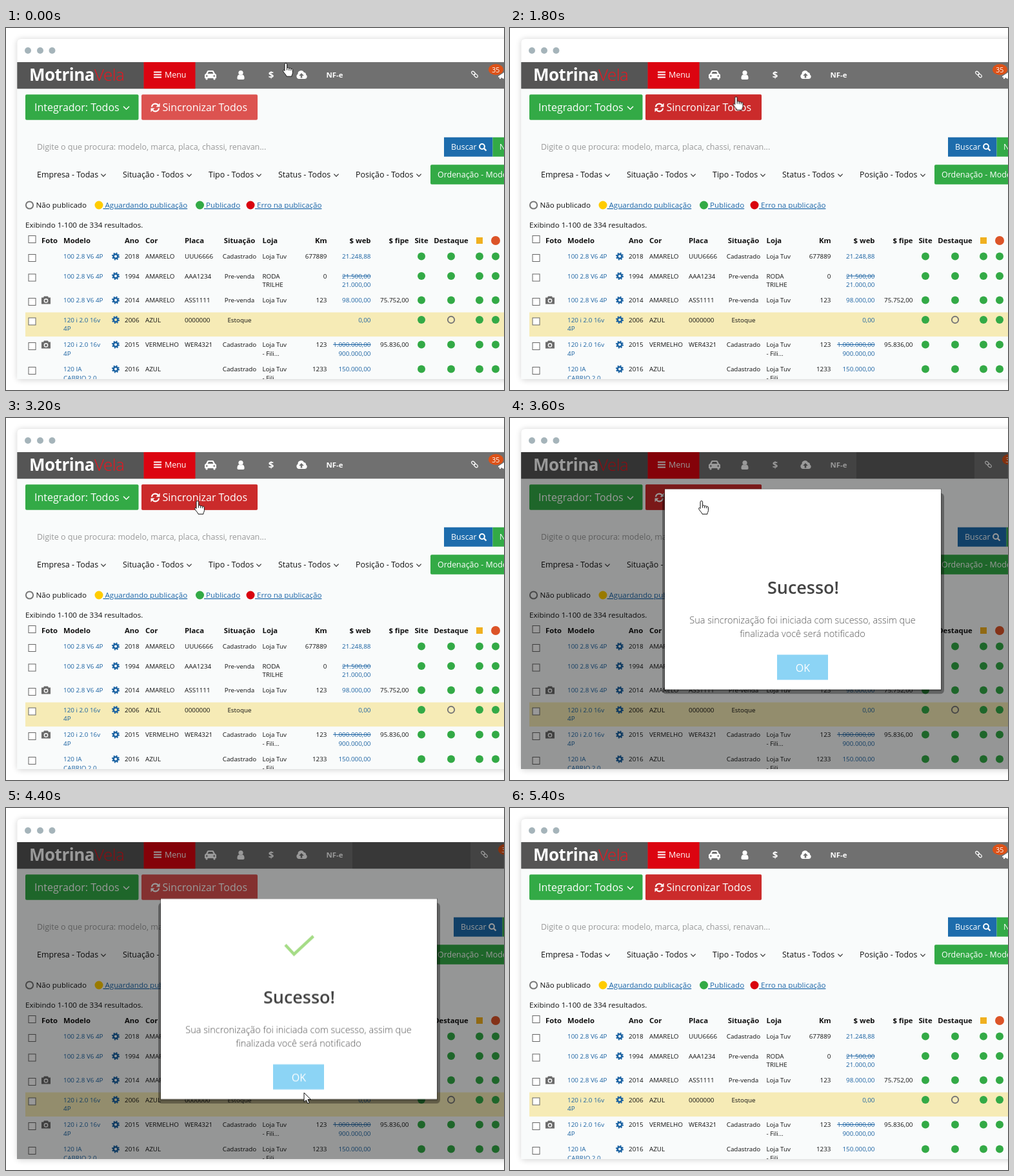
An HTML page that plays this animation: 772x562 px, repeating every 6 s.

```html
<!DOCTYPE html>
<html lang="pt">
<head>
<meta charset="utf-8">
<title>Sincronizar anúncios</title>
<style>
html, body { margin: 0; width: 772px; height: 562px; overflow: hidden; background: #fff; }
svg { display: block; font-family: "Open Sans", "Noto Sans", sans-serif; fill: #111; }
.big { font-size: 16px; }
.mid { font-size: 12.45px; }
.small { font-size: 11.6px; }
.cell { font-size: 9.85px; }
.head { font-size: 11.3px; font-weight: 700; }
.white { fill: #fff; }
.blue { fill: #1a62a2; }
.green { fill: #33aa46; }
.link { fill: #1a65a8; text-decoration: underline; }
.old { text-decoration: line-through; }
.c { text-anchor: middle; }
.r { text-anchor: end; }
.line { fill: none; stroke-width: 1.2; }

/* Everything runs on one six second clock that ticks every 200 ms. */
.navHover, .syncHover, .status, .veil, .shift, .modal, .hand, .arrow { animation: 6s step-end infinite; }
.navHover { animation-name: navHover; }
.syncHover { animation-name: syncHover; }
.status { animation-name: status; }
.veil { animation-name: veil; }
.shift { animation-name: shift; }
.modal { animation-name: drop; }
.hand { animation-name: hand; }
.arrow { animation-name: arrow; }
.check { stroke-dasharray: 1 2; animation: check 6s step-end infinite; }
.cursor { animation: move 6s linear infinite; }

@keyframes navHover { 0%, 23.33% { opacity: 0 } 6.66% { opacity: 1 } }
@keyframes status { 0%, 23.33% { opacity: 1 } 6.66% { opacity: 0 } }
@keyframes syncHover { 0%, 63.33% { opacity: 0 } 30%, 83.33% { opacity: 1 } }
@keyframes veil { 0%, 90% { opacity: 0 } 60% { opacity: 1 } 86.66% { opacity: .5 } }
@keyframes shift { 0%, 90% { transform: none } 60% { transform: translateX(15px) } }
@keyframes drop { 0% { transform: translateY(-30.5px) } 63.33% { transform: none } }
@keyframes check { 0% { stroke-dashoffset: 1.1 } 66.66% { stroke-dashoffset: .7 } 70% { stroke-dashoffset: 0 } }
@keyframes hand { 0%, 76.66% { opacity: 1 } 63.33%, 90% { opacity: 0 } }
@keyframes arrow { 0%, 76.66% { opacity: 0 } 63.33% { opacity: 1 } }
@keyframes move {
  0% { transform: translate(434px, 55px); animation-timing-function: steps(5) }
  16.66% { transform: translate(459.5px, 73px) }
  20% { transform: translate(459.5px, 73px); animation-timing-function: steps(5) }
  36.66% { transform: translate(278px, 130px); animation-timing-function: steps(5) }
  53.33% { transform: translate(297px, 129px) }
  60% { transform: translate(297px, 129px); animation-timing-function: steps(4) }
  73.33% { transform: translate(462px, 442px); animation-timing-function: steps(2) }
  80%, 100% { transform: translate(458px, 424px) }
}
</style>
</head>
<body>
<svg width="772" height="562" viewBox="0 0 772 562">
  <defs>
    <clipPath id="page"><path d="M17.500 53H772V545H17.500Z"/></clipPath>
    <filter id="soft" x="-10%" y="-10%" width="120%" height="120%"><feGaussianBlur stdDeviation="5"/></filter>
    <path id="chev" class="line" d="M-3.600-1.800 0 1.800 3.600-1.800"/>
    <g id="gear">
      <circle class="line" r="3.300" style="stroke-width:2.600"/>
      <circle class="line" r="5" style="stroke-width:2" stroke-dasharray="1.960"/>
    </g>
    <g id="camera" fill="#6b6b6b">
      <path d="M-7-4H-4L-3-6H3L4-4H7V6H-7Z"/>
      <circle cy="1" r="3.300" fill="#fff"/><circle cy="1" r="2"/>
    </g>
    <rect id="box" x="-5.500" y="-5.500" width="11" height="11" fill="#fff" stroke="#666"/>
  </defs>

  <rect x="17" y="17" width="790" height="530" rx="6" fill="#000" opacity=".16" filter="url(#soft)"/>
  <path d="M17.500 545V23q0-6 6-6H772V545Z" fill="#fff"/>
  <g fill="#a5b4ba"><circle cx="34" cy="35" r="5"/><circle cx="53" cy="35" r="5"/><circle cx="71.500" cy="35" r="5"/></g>

  <g clip-path="url(#page)">
    <rect x="17" y="53" width="755" height="492" fill="#f9fbfb"/>

    <!-- Top bar -->
    <rect x="17" y="53" width="755" height="41.200" fill="#707070"/>
    <rect x="17" y="53" width="196.500" height="41.200" fill="#555"/>
    <rect x="213.500" y="53" width="80" height="41.200" fill="#dc0410"/>
    <rect class="navHover" x="436" y="53" width="45.500" height="41.200" fill="#999"/>
    <text x="36" y="82" font-size="26" letter-spacing="-.5" font-weight="700" class="white">Motrina<tspan font-weight="300" fill="#ee141e">Vela</tspan></text>
    <path d="M229 68.500h12M229 72.500h12M229 76.500h12" stroke="#fff" stroke-width="2"/>
    <text x="246" y="76.500" class="mid white">Menu</text>
    <g class="white">
      <path fill-rule="evenodd" d="M308 73q0-1.500 2-2l2-4q.5-1 2-1h6q1.500 0 2 1l2 4q2 .5 2 2v5h-1.500v1.500q0 1-1.500 1t-1.500-1V78h-9v1.500q0 1-1.500 1t-1.500-1V78H308ZM312.500 71h9l-1.500-3h-6ZM310 74.500a1.300 1.300 0 1 0 2.600 0a1.300 1.300 0 1 0-2.600 0M321.400 74.500a1.300 1.300 0 1 0 2.600 0a1.300 1.300 0 1 0-2.600 0"/>
      <circle cx="364" cy="69.500" r="3.600"/>
      <path d="M358.500 79q-.5-6 3-6.500q2.500 1.500 5 0q3.500.5 3 6.500q-1 1-2 1h-7q-1 0-2-1"/>
      <text x="411" y="77.500" font-size="15" font-weight="700" class="c">$</text>
      <path fill-rule="evenodd" d="M454 79a4 4 0 0 1-1.500-7.500a5 5 0 0 1 9.500-2.500a3 3 0 0 1 3 3.500a3.500 3.500 0 0 1-1.500 6.500ZM458 70l-3.800 4h2.500v3.500h2.600V74h2.500Z"/>
      <text x="496.500" y="76.500" font-size="11.400" font-weight="700">NF-e</text>
    </g>
    <g class="shift">
      <g class="line" stroke="#fff" stroke-width="1.600" transform="translate(726.500 72) rotate(45)">
        <rect x="-6" y="-2" width="6.500" height="4" rx="2"/><rect x="-.500" y="-2" width="6.500" height="4" rx="2"/>
      </g>
      <path class="white" d="M763 75l9-6v10l-5-2v2h-2v-2.500h-2Z"/>
      <ellipse cx="759.500" cy="64.500" rx="11.500" ry="8.500" fill="#dd5218"/>
      <text x="759.300" y="68.500" font-size="10.500" class="c white">35</text>
    </g>

    <!-- Actions and filters -->
    <rect class="green" x="30" y="103.300" width="175.500" height="39.400" rx="2"/>
    <text x="44" y="129" class="big white">Integrador: Todos</text>
    <use href="#chev" transform="translate(186.500 124) scale(1.250)" stroke="#fff"/>
    <rect x="210" y="103.300" width="180" height="39.400" rx="2" fill="#dc5350"/>
    <rect class="syncHover" x="210" y="103.300" width="180" height="39.400" rx="2" fill="#cb2b2b"/>
    <g transform="translate(231.500 123.500)">
      <path class="line" stroke="#fff" style="stroke-width:2.200" d="M-5.500-1A5.500 5.500 0 0 1 4.500-3.500M5.500 1A5.500 5.500 0 0 1-4.500 3.500"/>
      <path class="white" d="M7-7V-1H1ZM-7 7V1H-1Z"/>
    </g>
    <text x="242.500" y="129" class="big white">Sincronizar Todos</text>
    <text x="48" y="189" font-size="12.500" fill="#999">Digite o que procura: modelo, marca, placa, chassi, renavan...</text>
    <g class="shift">
      <rect x="679" y="169.700" width="75.500" height="30" fill="#1d6cac"/>
      <rect class="green" x="754.500" y="169.700" width="40" height="30"/>
      <text x="690" y="189" class="mid white">Buscar</text>
      <circle class="line" cx="738" cy="184" r="3.900" stroke="#fff" style="stroke-width:2"/>
      <path d="M741 187l3.500 3.500" stroke="#fff" stroke-width="2.400"/>
      <text x="765" y="189" class="mid white">Novo</text>
    </g>
    <g id="filters" class="mid"></g>
    <rect class="green" x="658" y="212.300" width="130" height="30.500" rx="2"/>
    <text x="669" y="232" class="mid white">Ordenação - Modelo</text>

    <!-- Legend -->
    <circle class="line" cx="36.500" cy="275" r="5.600" stroke="#777" style="stroke-width:2"/>
    <circle cx="144" cy="275" r="6.500" fill="#fc0"/>
    <circle cx="300.500" cy="275" r="6.500" class="green"/>
    <circle cx="379" cy="275" r="6.500" fill="#d9040f"/>
    <g class="small">
      <text x="46.500" y="279">Não publicado</text>
      <text x="150.500" y="279" class="link">&nbsp;Aguardando publicação</text>
      <text x="307" y="279" class="link">&nbsp;Publicado</text>
      <text x="386" y="279" class="link">&nbsp;Erro na publicação</text>
      <text x="30" y="310">Exibindo 1-100 de 334 resultados.</text>
    </g>

    <!-- Table -->
    <rect x="30" y="441.500" width="742" height="37.500" fill="#f6ebb6"/>
    <g id="heads" class="head"></g>
    <use href="#box" x="40.500" y="328"/>
    <rect x="729" y="325" width="10" height="10" fill="#f0b020"/>
    <circle cx="759" cy="330" r="7" fill="#dc5428"/>
    <g id="rows" class="cell"></g>

    <!-- Dialog -->
    <g class="veil">
      <rect x="17" y="53" width="755" height="492" opacity=".4" fill="#000"/>
      <rect x="537" y="53" width="183" height="41.200" opacity=".16" fill="#000"/>
      <g class="modal">
        <rect x="236" y="147" width="437" height="312" rx="6" fill="#000" opacity=".35"/>
        <rect x="239" y="140" width="430" height="314" rx="1" fill="#000" opacity=".35"/>
        <rect x="240" y="141" width="428" height="311" fill="#fff"/>
        <path class="line check" pathLength="1" d="M433 212.500 446.500 227 476.500 199" stroke="#a5dc86" style="stroke-width:4.500"/>
        <text x="454.500" y="303.500" font-size="27" font-weight="600" fill="#444" class="c">Sucesso!</text>
        <g font-size="14.500" font-weight="300" fill="#555" class="c">
          <text x="453.500" y="349.500">Sua sincronização foi iniciada com sucesso, assim que</text>
          <text x="453.500" y="370">finalizada você será notificado</text>
        </g>
        <rect x="414" y="398" width="79" height="39" fill="#8cd4f5"/>
        <text x="454" y="424" class="big white c">OK</text>
      </g>
    </g>
  </g>

  <g class="cursor" fill="#fff" stroke="#111">
    <path class="hand" d="M-2 1.500a1.800 1.800 0 0 1 3.600 0V7.500a1.700 1.700 0 0 1 3.200.5a1.700 1.700 0 0 1 3 .7a1.500 1.500 0 0 1 2.600 1v5c0 2-1.500 3-1.500 5.500H1c0-2-5-6-5.500-8.500c0-1.500 1.500-1.800 2.500-.2ZM1.600 7.500v3M4.800 8v3M7.800 8.700v2.500"/>
    <path class="arrow" d="M0 0V14.500L3.400 11.400 5.800 16.800 8.200 15.800 5.900 10.500H10.500Z"/>
  </g>
</svg>
<script>
const get = id => document.getElementById(id);
const text = (x, y, str, cls = "") => str ? `<text x="${x}" y="${y}" class="${cls}">${str}</text>` : "";
const use = (id, x, y, color = "none") => `<use href="#${id}" x="${x}" y="${y}" stroke="${color}"/>`;

const filters = [["Empresa - Todas", 48, 151], ["Situação - Todos", 181, 284], ["Tipo - Todos", 314, 392],
  ["Status - Todos", 422, 512], ["Posição - Todos", 542, 640]];
get("filters").innerHTML = filters.map(([label, x, arrow]) =>
  text(x, 232, label) + use("chev", arrow, 228.5, "#333")).join("");

const heads = [["Foto", 55], ["Modelo", 89], ["Ano", 184], ["Cor", 216], ["Placa", 277], ["Situação", 362, "c"],
  ["Loja", 397.5], ["Km", 497.5, "r"], ["$ web", 565.5, "r"], ["$ fipe", 624.5, "r"], ["Site", 644, "c"], ["Destaque", 690, "c"]];
get("heads").innerHTML = heads.map(([label, x, cls]) => text(x, 334, label, cls)).join("");

const rows = [
  { y: 355, model: ["100 2.8 V6 4P"], year: 2018, color: "AMARELO", plate: "UUU6666", state: "Cadastrado", shop: ["Loja Tuv"], km: "677889", web: ["21.248,88"] },
  { y: 385.5, model: ["100 2.8 V6 4P"], year: 1994, color: "AMARELO", plate: "AAA1234", state: "Pre-venda", shop: ["RODA", "TRILHE"], km: "0", web: ["21.500,00", "21.000,00"] },
  { y: 423, model: ["100 2.8 V6 4P"], photo: true, year: 2014, color: "AMARELO", plate: "ASS1111", state: "Pre-venda", shop: ["Loja Tuv"], km: "123", web: ["98.000,00"], fipe: "75.752,00" },
  { y: 453.5, model: ["120 i 2.0 16v", "4P"], year: 2006, color: "AZUL", plate: "0000000", state: "Estoque", shop: [], web: ["0,00"], ring: true },
  { y: 492, model: ["120 i 2.0 16v", "4P"], photo: true, year: 2015, color: "VERMELHO", plate: "WER4321", state: "Cadastrado", shop: ["Loja Tuv", "- Fili..."], km: "123", web: ["1.000.000,00", "900.000,00"], fipe: "95.836,00" },
  { y: 530, model: ["120 IA", "CABRIO 2.0"], year: 2016, color: "AZUL", state: "Cadastrado", shop: ["Loja Tuv", "- Fili..."], km: "1233", web: ["150.000,00"] }
];

const dot = (x, y, ring) => ring
  ? `<circle class="line" cx="${x}" cy="${y}" r="5.2" stroke="#777" style="stroke-width:1.9"/>`
  : `<circle class="green" cx="${x}" cy="${y}" r="6"/>`;

function drawRow(row) {
  const base = row.y + 3.2;
  const lines = (x, list, cls) => list.map((str, i) => text(x, base + 13.7 * i, str, cls(i))).join("");
  const last = row.y === 530;
  return use("box", 40.5, row.y + 2) +
    (row.photo ? use("camera", 62, row.y - .6) : "") +
    lines(89, row.model, i => last && i ? "blue status" : "blue") +
    use("gear", 170, row.y - .5, "#1a62a2") +
    text(184, base, row.year) + text(216, base, row.color) + text(277, base, row.plate) +
    text(362, base, row.state, "c") +
    lines(397.5, row.shop, () => "") +
    text(497.5, base, row.km, "r") +
    lines(565.5, row.web, i => "blue r" + (row.web.length > 1 && !i ? " old" : "")) +
    text(624.5, base, row.fipe, "r") +
    [644, 690, 734, 759].map(x => dot(x, row.y - .5, row.ring && x === 690)).join("");
}
get("rows").innerHTML = rows.map(drawRow).join("");
</script>
</body>
</html>
```
